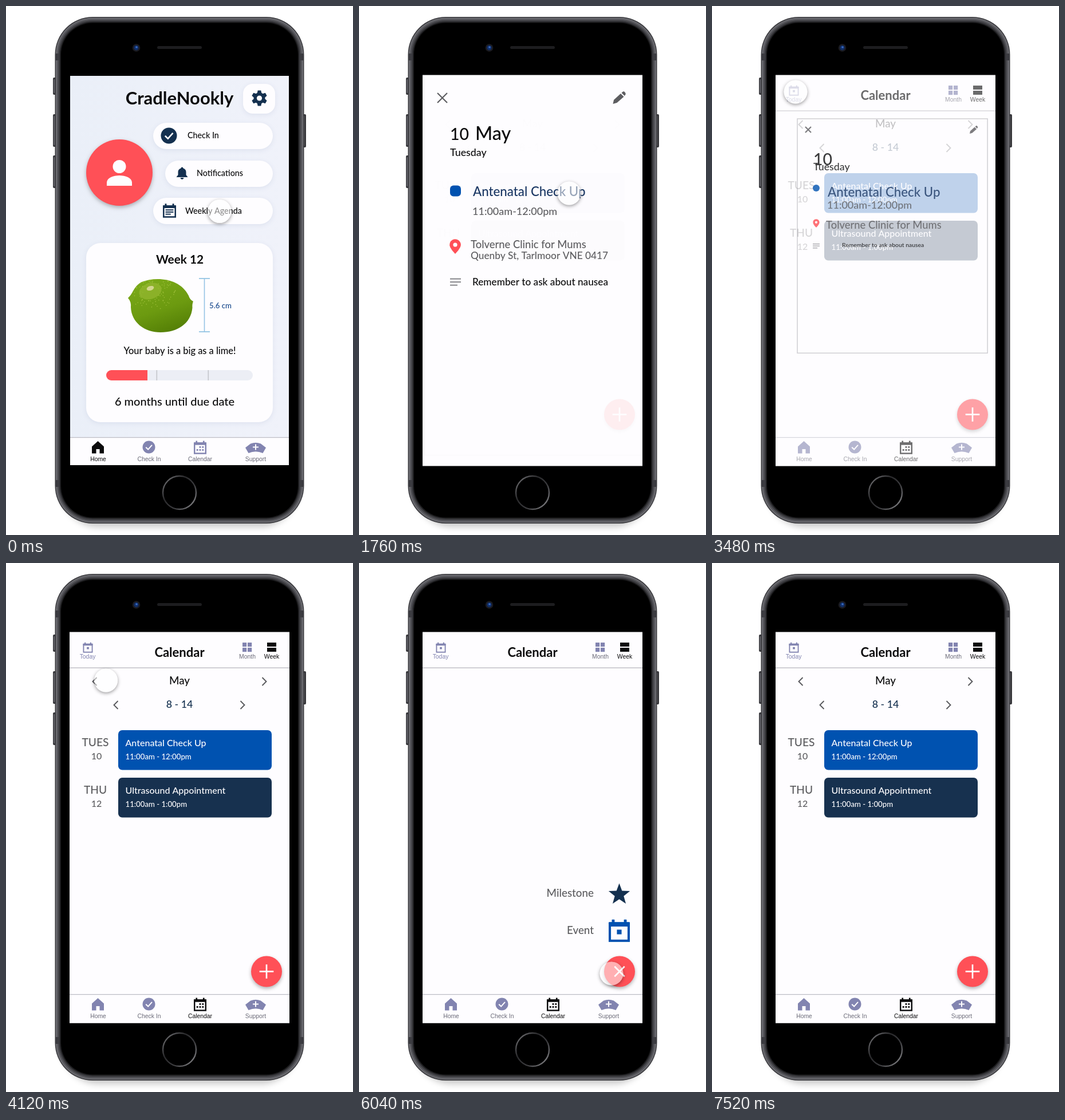
Animation of 606x924 px, one loop 7560 ms. Source, as an HTML page with a canvas:

```html
<!DOCTYPE html>
<html lang="en">
<head>
<meta charset="utf-8">
<title>Pregnancy app walkthrough</title>
<style>
html, body { margin: 0; width: 100%; height: 100%; overflow: hidden; background: #fff; }
canvas { display: block; }
</style>
</head>
<body>
<canvas id="stage" width="606" height="924"></canvas>
<script>
const stage = document.getElementById('stage');
let ctx = stage.getContext('2d');
const LOOP = 7560, STEP = 40;
const RED = '#ff5057', NAVY = '#14304f', BLUE = '#0052b0', LILAC = '#8284b0';
const PAPER = '#fefdff', GREY = '#5d5d60', INK = '#0b0b0c';

// ---- helpers ----
const clamp = v => Math.min(1, Math.max(0, v));
const span = (t, start, length) => clamp((t - start) / length);
const easeOut = u => 1 - (1 - u) ** 3;
const easeInOut = u => u < .5 ? 4 * u ** 3 : 1 - (2 - 2 * u) ** 3 / 2;
const mix = (a, b, u) => a + (b - a) * u;

function box(x, y, w, h, r, color) {
  ctx.beginPath();
  ctx.roundRect(x, y, w, h, r);
  ctx.fillStyle = color;
  ctx.fill();
}
function disc(x, y, r, color) {
  ctx.beginPath();
  ctx.arc(x, y, r, 0, Math.PI * 2);
  ctx.fillStyle = color;
  ctx.fill();
}
function line(points, color, width) {
  ctx.beginPath();
  points.forEach(([x, y]) => ctx.lineTo(x, y));
  ctx.strokeStyle = color;
  ctx.lineWidth = width;
  ctx.stroke();
}
function poly(points, color) {
  ctx.beginPath();
  points.forEach(([x, y]) => ctx.lineTo(x, y));
  ctx.closePath();
  ctx.fillStyle = color;
  ctx.fill();
}
function text(str, x, y, size, color, align = 'left', weight = 500) {
  ctx.font = `${weight} ${size}px Lato, "Open Sans", sans-serif`;
  ctx.textAlign = align;
  ctx.fillStyle = color;
  ctx.fillText(str, x, y);
}
function label(str, x, y, color) {
  ctx.font = '10.4px "Liberation Sans", Arial, sans-serif';
  ctx.textAlign = 'center';
  ctx.fillStyle = color;
  ctx.fillText(str, x, y);
}
// Draws a group on its own layer, so overlapping parts fade as one.
const layers = [];
let depth = 0;
function newLayer() {
  const canvas = document.createElement('canvas');
  canvas.width = stage.width;
  canvas.height = stage.height;
  return canvas.getContext('2d');
}
function fade(alpha, draw) {
  if (alpha <= 0) return;
  if (alpha >= 1) return draw();
  const under = ctx;
  ctx = layers[depth] ??= newLayer();
  depth++;
  ctx.clearRect(0, 0, stage.width, stage.height);
  draw();
  depth--;
  const layer = ctx.canvas;
  ctx = under;
  ctx.globalAlpha = alpha;
  ctx.drawImage(layer, 0, 0);
  ctx.globalAlpha = 1;
}
function shadow(color, blur, dy, draw) {
  ctx.save();
  ctx.shadowColor = color;
  ctx.shadowBlur = blur;
  ctx.shadowOffsetY = dy;
  draw();
  ctx.restore();
}
function at(x, y, scale, draw) {
  ctx.save();
  ctx.translate(x, y);
  ctx.scale(scale, scale);
  draw();
  ctx.restore();
}

// ---- icons, drawn around their centre ----
function calendarIcon(x, y, size, color, kind) {
  at(x, y, size / 20, () => {
    ctx.strokeStyle = color;
    ctx.lineWidth = 2.2;
    ctx.strokeRect(-8.9, -7.3, 17.8, 16.4);
    box(-10, -8.5, 20, 4.2, 1, color);
    box(-7, -11, 2.6, 4, .5, color);
    box(4.4, -11, 2.6, 4, .5, color);
    if (kind === 'day') box(-2.2, -1.4, 4.4, 4.4, 0, color);
    if (kind === 'lines') [-1.6, 1.6, 4.8].forEach((v, i) => box(-6, v - .8, i < 2 ? 12 : 8, 1.7, 0, color));
    if (kind === 'dots') [[0, -1], [4.4, -1], [-4.4, 3.6], [0, 3.6], [4.4, 3.6]]
      .forEach(([u, v]) => box(u - 1.3, v - 1.3, 2.6, 2.6, 0, color));
  });
}
function checkIcon(x, y, r, color) {
  disc(x, y, r, color);
  line([[x - r * .48, y + r * .02], [x - r * .12, y + r * .37], [x + r * .5, y - r * .33]], PAPER, r * .19);
}
function gearIcon(x, y) {
  for (let i = 0; i < 6; i++) {
    ctx.save();
    ctx.translate(x, y);
    ctx.rotate(i * Math.PI / 3);
    poly([[-4.2, -7], [-2.8, -13.5], [2.8, -13.5], [4.2, -7]], NAVY);
    ctx.restore();
  }
  disc(x, y, 10, NAVY);
  disc(x, y, 4.6, PAPER);
}
function bellIcon(x, y) {
  ctx.beginPath();
  ctx.moveTo(x - 10, y + 7);
  ctx.lineTo(x - 7, y + 3);
  ctx.lineTo(x - 7, y - 2);
  ctx.bezierCurveTo(x - 7, y - 11, x + 7, y - 11, x + 7, y - 2);
  ctx.lineTo(x + 7, y + 3);
  ctx.lineTo(x + 10, y + 7);
  ctx.closePath();
  ctx.fillStyle = NAVY;
  ctx.fill();
  disc(x, y - 8.5, 2, NAVY);
  ctx.beginPath();
  ctx.arc(x, y + 8, 2.8, 0, Math.PI);
  ctx.fill();
}
function houseIcon(x, y, color) {
  poly([[x, y - 11], [x + 10.5, y - 1.5], [x + 10.5, y + 10.5], [x + 3, y + 10.5], [x + 3, y + 3],
    [x - 3, y + 3], [x - 3, y + 10.5], [x - 10.5, y + 10.5], [x - 10.5, y - 1.5]], color);
}
function capIcon(x, y, color) {
  ctx.beginPath();
  ctx.moveTo(x - 18, y);
  ctx.lineTo(x - 9, y - 7);
  ctx.quadraticCurveTo(x, y - 10.5, x + 9, y - 7);
  ctx.lineTo(x + 18, y);
  ctx.lineTo(x + 12.5, y + 9.5);
  ctx.quadraticCurveTo(x, y + 4, x - 12.5, y + 9.5);
  ctx.closePath();
  ctx.fillStyle = color;
  ctx.fill();
  box(x - 5, y - 2, 10, 2, 0, PAPER);
  box(x - 1, y - 6, 2, 10, 0, PAPER);
}
function starIcon(x, y, r, color) {
  const pts = [];
  for (let i = 0; i < 10; i++) {
    const a = i * Math.PI / 5 - Math.PI / 2, d = i % 2 ? r * .42 : r;
    pts.push([x + d * Math.cos(a), y + d * Math.sin(a)]);
  }
  poly(pts, color);
}
function crossIcon(x, y, half, color, width) {
  line([[x - half, y - half], [x + half, y + half]], color, width);
  line([[x + half, y - half], [x - half, y + half]], color, width);
}
function pencilIcon(x, y, size) {
  at(x, y, size / 22, () => {
    poly([[-11, 11], [-9.5, 4], [2.5, -7], [8, -1.5], [-4, 9]], GREY);
    poly([[4, -8.3], [6.5, -10.5], [8.5, -10.8], [11, -8], [11, -5.8], [9.4, -2.9]], GREY);
  });
}
function pinIcon(x, y, size) {
  at(x, y, size / 26, () => {
    ctx.beginPath();
    ctx.arc(0, -3, 9.8, Math.PI * .85, Math.PI * .15);
    ctx.quadraticCurveTo(6, 7, 0, 13);
    ctx.quadraticCurveTo(-6, 7, -8.7, 1.5);
    ctx.fillStyle = RED;
    ctx.fill();
    disc(0, -3, 3.6, PAPER);
  });
}
function chevron(x, y, dir) {
  line([[x - dir * 3.5, y - 7], [x + dir * 3.5, y], [x - dir * 3.5, y + 7]], '#58585c', 1.9);
}

// ---- phone ----
function phone() {
  ctx.fillStyle = '#fff';
  ctx.fillRect(0, 0, 606, 924);
  [[82, 125, 30], [82, 189, 57], [82, 261, 57], [518, 189, 58]].forEach(([x, y, h]) => {
    box(x, y, 6, h, 2, '#39393d');
    box(x + 1.5, y + 3, 1.5, h - 6, 1, '#707076');
  });
  shadow('rgba(0,0,0,.22)', 12, 7, () => box(98, 700, 410, 203, 64, '#333'));
  // nested rims from the outer edge inwards
  [[0, '#3a3a3e'], [1.5, '#6c6c71'], [3.5, '#55555a'], [6, '#3c3c40'], [8.5, '#1d1d1f'], [10.5, '#000']]
    .forEach(([d, color]) => box(85.5 + d, 19 + d, 435 - d * 2, 885 - d * 2, 66 - d, color));
  [83, 828].forEach(y => {
    box(86, y, 8, 12, 0, '#3b3b40');
    box(512, y, 8, 12, 0, '#3b3b40');
  });
  disc(227.5, 73, 6.8, '#1b1b20');
  disc(227.5, 73, 4.2, '#102e68');
  disc(228, 72, 1.8, '#3c6cc0');
  box(264, 70, 78, 5, 2.5, '#1d1d1f');
  const ring = ctx.createLinearGradient(275, 825, 331, 875);
  ring.addColorStop(0, '#77777a');
  ring.addColorStop(.35, '#29292b');
  ring.addColorStop(.65, '#3d3d40');
  ring.addColorStop(1, '#8a8a8d');
  ctx.beginPath();
  ctx.arc(303, 850, 29, 0, Math.PI * 2);
  ctx.strokeStyle = ring;
  ctx.lineWidth = 2.4;
  ctx.stroke();
}

// ---- screens ----
function navBar(active) {
  const tint = name => name === active ? INK : LILAC;
  const ink = name => name === active ? INK : '#6b6b78';
  box(111, 753, 384, 50.5, 0, PAPER);
  box(111, 753, 384, 1.3, 0, '#bdbdc5');
  houseIcon(160.5, 771, tint('Home'));
  checkIcon(249.5, 770.5, 11, tint('Check In'));
  calendarIcon(339, 771.5, 22, tint('Calendar'), 'dots');
  capIcon(436, 771.5, tint('Support'));
  [['Home', 161], ['Check In', 250], ['Calendar', 339], ['Support', 436]]
    .forEach(([name, x]) => label(name, x, 795, ink(name)));
}

function lime() {
  ctx.save();
  const skin = ctx.createLinearGradient(255, 480, 285, 570);
  skin.addColorStop(0, '#79a818');
  skin.addColorStop(.55, '#6c9a10');
  skin.addColorStop(1, '#547f06');
  ctx.beginPath();
  ctx.moveTo(213, 510);
  ctx.bezierCurveTo(222, 503, 222, 490, 237, 482);
  ctx.bezierCurveTo(262, 472, 304, 475, 319, 506);
  ctx.quadraticCurveTo(321, 513, 327, 516);
  ctx.quadraticCurveTo(325, 520, 325.5, 527);
  ctx.bezierCurveTo(323, 555, 299, 570, 270, 570);
  ctx.bezierCurveTo(242, 570, 219, 553, 218, 526);
  ctx.quadraticCurveTo(219, 517, 213, 510);
  ctx.fillStyle = skin;
  ctx.fill();
  ctx.clip();
  let seed = 7;
  const rand = () => (seed = seed * 16807 % 2147483647) / 2147483647;
  for (let i = 0; i < 110; i++) {
    const a = rand() * Math.PI * 2, d = 14 + rand() * 28;
    disc(254 + Math.cos(a) * d, 500 + Math.sin(a) * d * .75, .8, 'rgba(178,205,75,.7)');
  }
  ctx.beginPath();
  ctx.ellipse(252, 498, 20, 14, -.3, 0, Math.PI * 2);
  ctx.fillStyle = 'rgba(146,182,45,.8)';
  ctx.fill();
  ctx.beginPath();
  ctx.ellipse(252, 493, 6.5, 3.8, -.3, 0, Math.PI * 2);
  ctx.fillStyle = '#d2d58f';
  ctx.fill();
  ctx.restore();
}

function home() {
  ctx.save();
  ctx.beginPath();
  ctx.rect(112, 122, 382, 680);
  ctx.clip();
  const sky = ctx.createLinearGradient(112, 0, 494, 0);
  sky.addColorStop(0, '#eaeff8');
  sky.addColorStop(1, '#f0f2fa');
  box(111, 120, 384, 684, 0, sky);
  text('CradleNookly', 303, 172, 31, INK, 'center', 700);
  shadow('rgba(90,110,160,.13)', 8, 2, () => {
    box(414, 136, 56, 52, 17, PAPER);
    box(257, 204, 209, 46, 23, PAPER);
    box(278, 270, 188, 46, 23, PAPER);
    box(257, 335, 209, 46, 23, PAPER);
    box(140, 414, 326, 313, 25, PAPER);
  });
  gearIcon(442.5, 161);
  checkIcon(284.5, 226.5, 14, NAVY);
  bellIcon(307.5, 292);
  calendarIcon(285.5, 358, 23, NAVY, 'lines');
  text('Check In', 317, 231, 14.3, INK);
  text('Notifications', 333, 297, 14.3, INK);
  text('Weekly Agenda', 313, 363, 14.3, INK);

  shadow('rgba(0,0,0,.28)', 7, 3, () => disc(198, 291, 58, RED));
  disc(198, 280.5, 11.5, PAPER);
  ctx.beginPath();
  ctx.moveTo(176, 314);
  ctx.lineTo(176, 308);
  ctx.bezierCurveTo(177, 292, 219, 292, 220, 308);
  ctx.lineTo(220, 314);
  ctx.fill();

  text('Week 12', 303.5, 450, 20.8, INK, 'center', 700);
  lime();
  line([[346.5, 476], [346.5, 569]], '#94c4e4', 1.6);
  [476, 569].forEach(y => line([[337, y], [356, y]], '#94c4e4', 1.8));
  text('5.6 cm', 355, 528, 13.2, '#17488c');
  text('Your baby is a big as a lime!', 303.5, 608, 16.4, INK, 'center');
  box(175, 636, 256, 18, 9, '#eceef5');
  box(175, 636, 72, 18, [9, 0, 0, 9], RED);
  [262.5, 352.5].forEach(x => box(x, 636, 1.6, 18, 0, '#c4c5cb'));
  text('6 months until due date', 294.5, 698, 20, INK, 'center');
  navBar('Home');
  ctx.restore();
}

function header() {
  box(111, 182.5, 384, 1.3, 0, '#b5b5bb');
  calendarIcon(143, 148, 17, LILAC, 'day');
  label('Today', 142.5, 167, LILAC);
  text('Calendar', 303, 164, 22, INK, 'center', 700);
  [413, 422].forEach(x => [139, 148].forEach(y => box(x, y, 7.2, 7.2, 0, LILAC)));
  label('Month', 421.5, 167, '#6b6b78');
  box(456, 139, 16, 7, 0, INK);
  box(456, 148, 16, 7, 0, INK);
  label('Week', 464, 167, INK);
}

function agenda() {
  chevron(155, 207, -1);
  chevron(451, 207, 1);
  chevron(192, 248, -1);
  chevron(413, 248, 1);
  text('May', 303, 212, 18.8, INK, 'center');
  text('8 - 14', 303, 253, 17.8, NAVY, 'center');
  const rows = [
    [292, 'TUES', '10', 'Antenatal Check Up', '11:00am - 12:00pm', BLUE],
    [375, 'THU', '12', 'Ultrasound Appointment', '11:00am - 1:00pm', '#17314f']
  ];
  rows.forEach(([y, day, date, title, hours, color]) => {
    text(day, 156, y + 28, 19.2, GREY, 'center');
    text(date, 158, y + 51, 16, GREY, 'center');
    box(196, y, 268, 69.5, 7, color);
    text(title, 208.5, y + 28, 16, PAPER);
    text(hours, 208.5, y + 51, 13.2, PAPER);
  });
}

function addButton(turn) {
  shadow('rgba(0,0,0,.3)', 6, 3, () => disc(455, 713.5, 27, RED));
  ctx.save();
  ctx.translate(455, 713.5);
  ctx.rotate(turn * Math.PI / 4);
  line([[-12.3, 0], [12.3, 0]], PAPER, 2.7);
  line([[0, -12.3], [0, 12.3]], PAPER, 2.7);
  ctx.restore();
}

function menu(m) {
  const x = mix(474, 454.5, m), edge = mix(459, 410, m), size = mix(12.5, 37, m);
  const starY = mix(703, 578, m), eventY = mix(717, 643, m), font = mix(5.5, 18.8, m);
  fade(m * 1.25, () => {
    starIcon(x, starY + size * .03, size * .53, NAVY);
    text('Milestone', edge, starY + font * .28, font, GREY, 'right');
    calendarIcon(x, eventY, size, BLUE, 'day');
    text('Event', edge, eventY + font * .28, font, GREY, 'right');
  });
}

// q: 0 = full screen sheet, 1 = folded into its card
function sheet(q) {
  const k = (q - .044) / .404;
  const go = (a, b) => mix(a, b, k);
  const small = (a, b) => Math.max(2, go(a, b));
  const left = mix(111, 196, q), top = mix(120, 292, q);
  ctx.strokeStyle = `rgba(150,150,158,${Math.min(q, 1 - q)})`;
  ctx.lineWidth = 1.5;
  ctx.strokeRect(left, top, mix(495, 464, q) - left, mix(804, 362, q) - top);
  const extra = 1 - k * 3;
  fade(1 - q * q, () => {
    crossIcon(go(145.5, 168), go(160.5, 216), small(8.5, 5), GREY, 2.2);
    pencilIcon(go(454.5, 457), go(160, 216), small(22, 14));
    text('10', go(159, 177), go(234, 278), 28.5, INK);
    fade(extra, () => text('May', go(203, 221), go(234, 278), 32.4, INK));
    text('Tuesday', go(159, 177), go(262, 287), 17.8, INK);
    const dot = small(19, 12);
    box(go(168.5, 182) - dot / 2, go(323, 318) - dot / 2, dot, dot, 6, BLUE);
    text('Antenatal Check Up', go(199, 202), go(332, 333.5), 22.3, '#1b3864');
    text('11:00am-12:00pm', go(198, 201), go(365, 353.5), 18, GREY);
    pinIcon(go(168, 182), go(420, 379.5), small(26, 15));
    text('Tolverne Clinic for Mums', go(195, 199), go(423, 389), 18.4, GREY);
    fade(extra, () => text('Quenby St, Tarlmoor VNE 0417', go(195, 199), go(442, 408), 17.3, GREY));
    const w = small(19, 12);
    [-1, 0, 1].forEach(i =>
      box(go(159, 176), go(482, 419) + i * w * .29 - w * .05, i < 1 ? w : w * .68, w * .11, 0, '#8a8a8e'));
    text('Remember to ask about nausea', go(198, 227), go(488, 421), small(17.2, 10.4), INK);
  });
}

function calendar(fold, m) {
  const chrome = fold * 1.5 - .07;
  box(111, 120.5, 384, 683, 0, PAPER);
  fade(chrome, header);
  fade(fold ** 1.75 * (1 - m), agenda);
  fade(chrome * .9 + fold * .1, () => navBar('Calendar'));
  if (m > 0) menu(m);
  fade(fold ** .8, () => addButton(m));
  if (fold < 1) sheet(fold);
}

// ---- pointer ----
const STOPS = [
  [1080, 380, 367, 327],
  [2380, 760, 146, 150],
  [3900, 760, 441, 717]
];
function pointer(t) {
  let x = 373, y = 358.5;
  STOPS.forEach(([start, length, tx, ty]) => {
    const u = easeInOut(span(t, start, length));
    x = mix(x, tx, u);
    y = mix(y, ty, u);
  });
  fade(1 - span(t, 6920, 200), () => {
    // soft rim only outside the disc, so the fill stays see-through
    ctx.save();
    ctx.beginPath();
    ctx.rect(0, 0, 606, 924);
    ctx.arc(x, y, 20.5, 0, Math.PI * 2, true);
    ctx.clip('evenodd');
    shadow('rgba(0,0,0,.42)', 6, 2, () => disc(x, y, 20.3, '#fff'));
    ctx.restore();
    disc(x, y, 20.5, 'rgba(255,255,255,.54)');
  });
}

function frame(now) {
  const t = Math.floor(now % LOOP / STEP) * STEP;
  const enter = easeInOut(span(t, 180, 320));
  const opened = easeOut(span(t, 1540, 340)), closed = easeOut(span(t, 3419, 340));
  const fold = 1 - opened + closed;
  const m = easeOut(span(t, 5022, 340)) - easeOut(span(t, 6440, 340));
  phone();
  if (enter > 0) calendar(fold, m);
  fade(1 - enter, home);
  pointer(t);
  requestAnimationFrame(frame);
}
requestAnimationFrame(frame);
</script>
</body>
</html>
```
